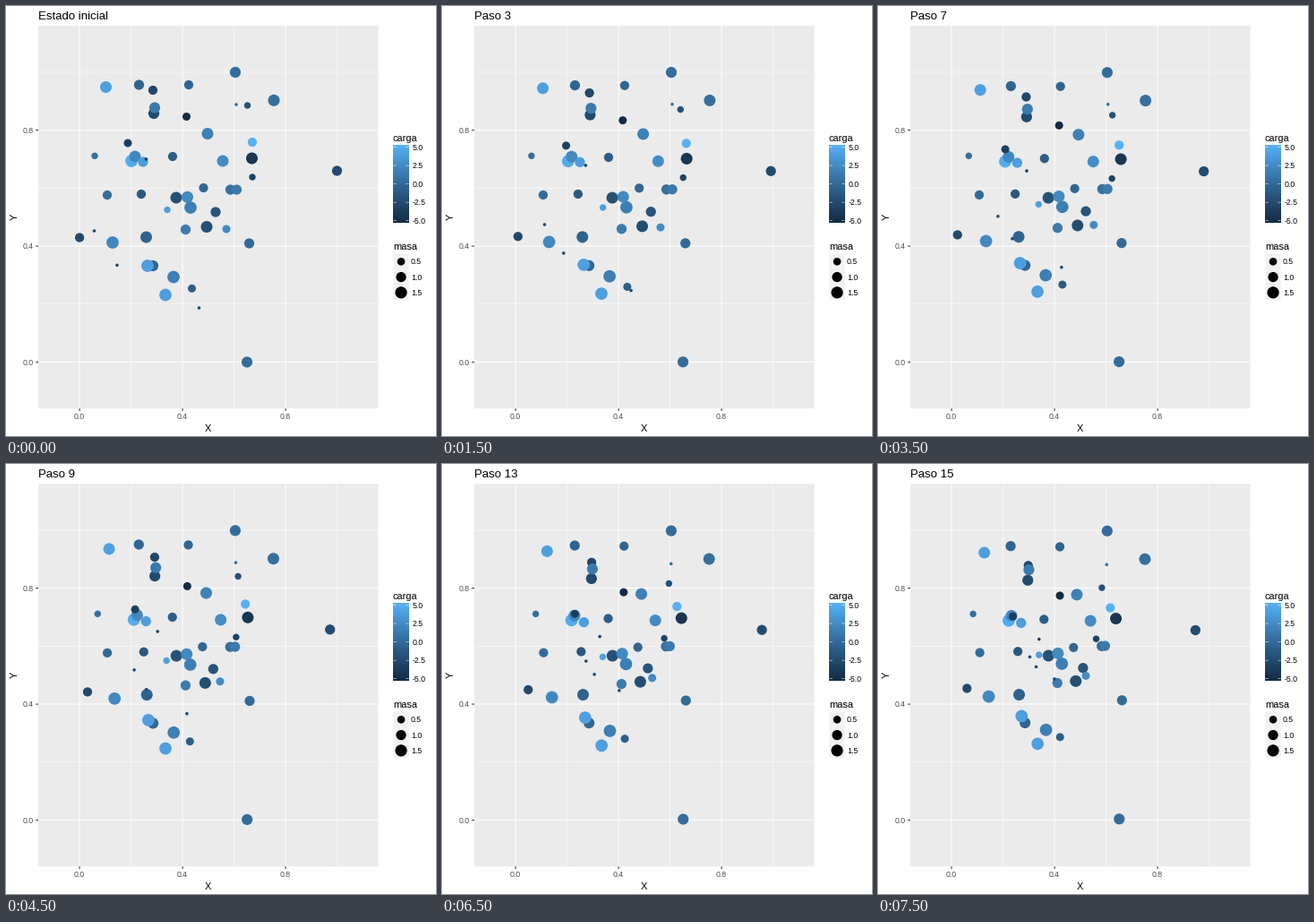
Animation of 480 by 480 pixels, one loop 8 s. Source, as a matplotlib script:

```python
import numpy as np
import matplotlib.pyplot as plt
from matplotlib.animation import FuncAnimation
from matplotlib.colors import LinearSegmentedColormap
from matplotlib.patches import Circle, Rectangle

SIZE, DPI = 480, 100
PT = 72 / DPI                       # points per pixel
STEPS = 16
STRIDE, EPS = 0.02, 0.001           # longest move per step, force softening
ORIGIN = np.array([82.1, 397.5])    # pixel of (0, 0)
UNIT = np.array([287.5, -323.6])    # pixels per data unit

plt.rcParams["font.family"] = "Liberation Sans"
blues = LinearSegmentedColormap.from_list(
    "carga", ["#132B43", "#22496C", "#326A98", "#438DC7", "#56B1F7"])

# Starting state: x and y in pixels, charge; the key is the mass class.
# Layers are listed in drawing order.
BACK = {
    1: [(269.5, 111, -1.9), (99, 167.3, 0.4), (275, 191, -3.2),
        (180, 227.5, 4.0)],
    3: [(164, 94, -2.7), (204, 88, -0.4), (275, 152, 5.3), (186, 168, -0.9),
        (113, 211, 0.1), (220.5, 203, -0.2), (151, 210, -1.4),
        (82, 258.5, -2.6)],
    5: [(165, 120, -2.5), (166, 113.5, 1.3), (256, 74, 0.2),
        (164, 290, -0.3), (269, 397.5, 0.2)],
    7: [(140, 173, 4.9), (206, 225, 1.6), (119, 264, 2.3), (158, 290, 4.0),
        (187, 302.5, 1.6), (178, 322.5, 4.0)],
}
FRONT = {
    6: [(111.5, 90.5, 4.0), (299, 105.3, 0.4), (225, 142.5, 1.8),
        (144, 168, 2.3), (242, 173, 2.6), (274.5, 170, -4.2),
        (190, 214, -1.9), (202.5, 213.3, 2.4), (224, 246.5, -2.2),
        (156.5, 258, -0.5)],
    4: [(148.5, 88, -0.4), (153, 174, 3.9), (369.5, 184, -2.4),
        (250.5, 205, 0.5), (257.5, 205, 1.2), (234, 230, -1.7),
        (200.5, 249.5, 1.3), (271.5, 265, 0.1)],
    2: [(201.5, 123.5, -5.2), (136, 153, -3.4), (207.5, 315.3, -0.9),
        (246, 249, 2.5)],
    0: [(257, 110, 0.2), (156.5, 171, -3.5), (98.5, 251, -2.6),
        (124, 289.3, -2.6), (215.5, 337, -2.6)],
}


def class_mass(k):
    return 0.12 + 0.22 * k


def radius(mass):
    """Marker area grows with mass."""
    return 1.78 + 5.33 * np.sqrt((mass - 0.12) / 1.69)


def shade(charge):
    return blues((charge + 5.2) / 10.5)


def velocity(pos, charge, mass):
    """Opposite charges attract, equal signs repel."""
    gap = pos[None] - pos[:, None]
    dist = np.linalg.norm(gap, axis=2) + EPS
    sign = np.where(np.outer(charge, charge) < 0, 1, -1)
    pull = sign * np.abs(charge[:, None] - charge) / dist
    return (pull[:, :, None] * gap).sum(axis=1) / mass[:, None]


def simulate(pos, charge, mass):
    states = [pos]
    for _ in range(STEPS - 1):
        v = velocity(pos, charge, mass)
        pos = np.clip(pos + STRIDE * v / np.abs(v).max(), 0, 1)
        states.append(pos)
    return states


fig = plt.figure(figsize=(SIZE / DPI, SIZE / DPI), dpi=DPI, facecolor="white")
ax = fig.add_axes([0, 0, 1, 1])
ax.axis("off")


def box(x, y, w, h, color):
    ax.add_patch(Rectangle((x, y), w, h, fc=color, lw=0, zorder=0,
                           snap=False))


def line(x0, y0, x1, y1, color="white", width=1.07):
    ax.plot([x0, x1], [y0, y1], color=color, lw=width * PT, snap=False,
            solid_capstyle="butt", zorder=1)


def label(x, y, text, size=8.8, color="black", **style):
    return ax.text(x, y, text, fontsize=size * PT, color=color, **style)


def dot(x, y, r, color, z=2):
    return ax.add_patch(Circle((x, y), r, fc=color, lw=0, zorder=z))


def draw_panel():
    left, bottom = ORIGIN - 0.16 * UNIT
    right, top = ORIGIN + 1.16 * UNIT
    box(left, top, right - left, bottom - top, "#EBEBEB")
    for first, width in ((0.2, 0.53), (0, 1.07)):
        for v in first + 0.4 * np.arange(3):
            x, y = ORIGIN + v * UNIT
            line(x, top, x, bottom, width=width)
            line(left, y, right, y, width=width)
    for v in (0, 0.4, 0.8):
        x, y = ORIGIN + v * UNIT
        line(x, bottom, x, bottom + 2.74, "#333333")
        line(left - 2.74, y, left, y, "#333333")
        label(x, 461, f"{v:.1f}", color="#4D4D4D", ha="center")
        label(31, y + 3.2, f"{v:.1f}", color="#4D4D4D", ha="right")
    label(225.8, 475, "X", 11, ha="center")
    label(9.5, 235.5, "Y", 11, rotation=90, ha="center", va="center")


def draw_legends():
    left, width = 432.4, 17.28
    right = left + width
    label(432, 151, "carga", 11)
    ax.imshow(np.linspace(1, 0, 256)[:, None], cmap=blues, aspect="auto",
              extent=(left, right, 241.7, 155.3), zorder=0,
              interpolation="bilinear")
    for k in range(5):
        y = 157.5 + 20.55 * k
        line(left, y, left + 3.46, y, width=0.53)
        line(right - 3.46, y, right, y, width=0.53)
        label(454, y + 3.2, f"{5 - 2.5 * k:.1f}")

    label(432, 272, "masa", 11)
    for k, mass in enumerate((0.5, 1.0, 1.5)):
        y = 285.3 + width * k
        box(left, y - width / 2, width, width, "#F2F2F2")
        dot(left + width / 2, y, radius(mass), "black")
        label(452, y + 3.2, f"{mass:.1f}")


draw_panel()
draw_legends()
ax.set(xlim=(0, SIZE), ylim=(SIZE, 0))
title = label(36, 15, "", 13.2)

rows = np.array([(x, y, q, class_mass(k)) for layer in (BACK, FRONT)
                 for k, dots in layer.items() for x, y, q in dots])
charge, mass = rows[:, 2], rows[:, 3]
start = np.clip((rows[:, :2] - ORIGIN) / UNIT, 0, 1)
states = simulate(start, charge, mass)
circles = [dot(0, 0, radius(m), shade(q), 3 + i / 100)
           for i, (q, m) in enumerate(zip(charge, mass))]


def update(step):
    title.set_text(f"Paso {step}" if step else "Estado inicial")
    for circle, center in zip(circles, ORIGIN + states[step] * UNIT):
        circle.center = center
    return [title, *circles]


anim = FuncAnimation(fig, update, frames=STEPS, interval=500,
                     repeat=True, repeat_delay=0, blit=False)
plt.show()
```
